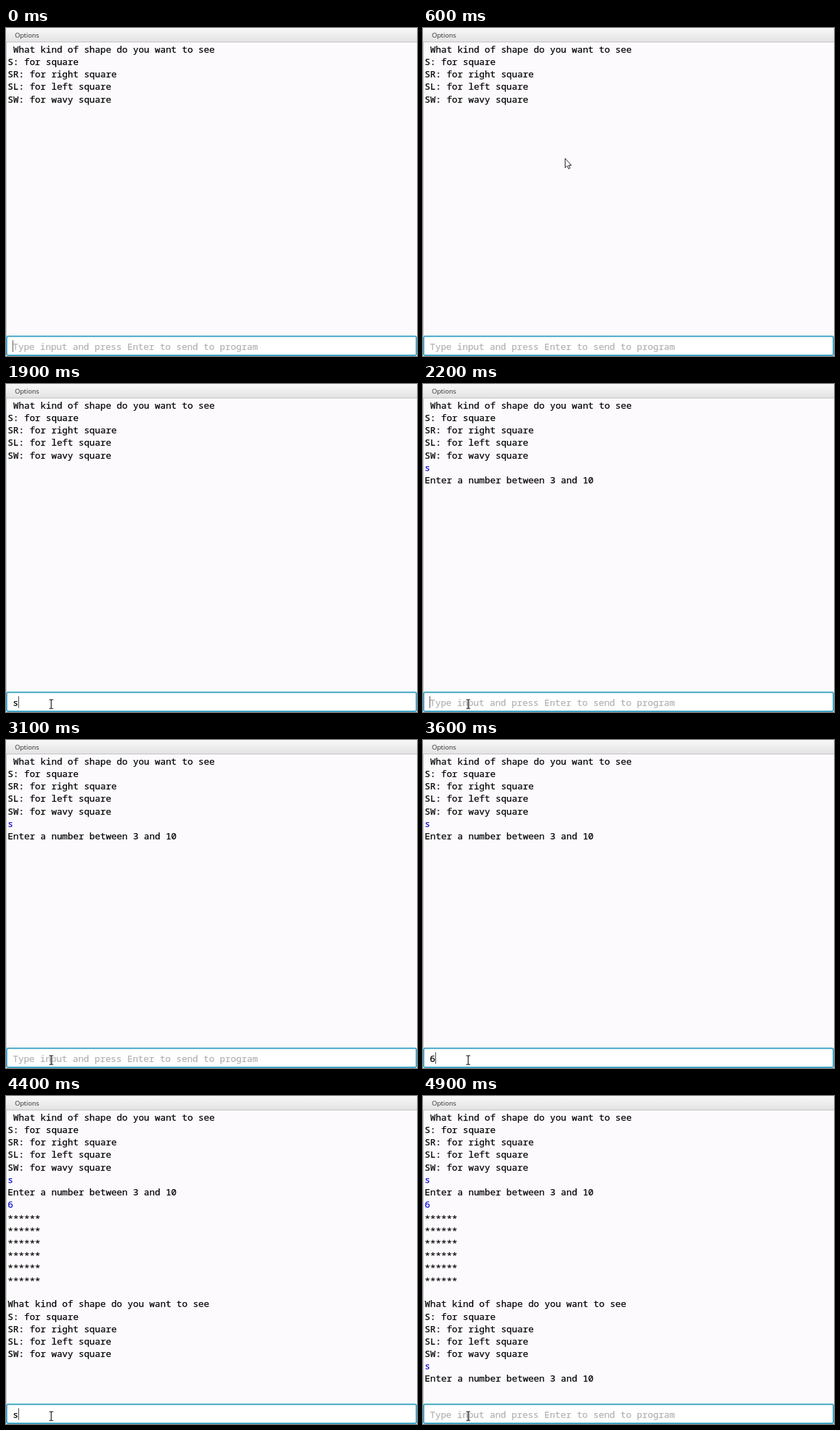
Animation of 600x479 px, one loop 5 s. Source, as an HTML page:

```html
<!DOCTYPE html>
<html lang="en">
<head>
<meta charset="utf-8">
<title>Shape console</title>
<style>
  html, body { margin: 0; width: 100%; height: 100%; overflow: hidden; background: #fff; }
  svg { display: block; }
  text {
    --ink: #000;
    white-space: pre;
    font: 13.26px "Roboto Mono", "Noto Sans Mono", monospace;
    fill: var(--ink);
    stroke: var(--ink);
    stroke-width: .25;
  }
  .menu { --ink: #2c2c2c; font: 9.6px "Open Sans", "Noto Sans", sans-serif; stroke: none; }
  .user { --ink: #0c0cd4; }
  .hint { --ink: #b3b1b4; }
</style>
</head>
<body>
<svg width="600" height="479" viewBox="0 0 600 479">
  <defs>
    <linearGradient id="bar" x2="0" y2="1">
      <stop stop-color="#f8f8f8"/>
      <stop offset="1" stop-color="#e4e3e4"/>
    </linearGradient>
  </defs>
  <rect width="600" height="479" fill="#fcfafd"/>
  <rect width="600" height="20" fill="url(#bar)"/>
  <rect y="20" width="600" height="1" fill="#c4c3c4"/>
  <rect y="20" width="1" height="430" fill="#c4c3c4"/>
  <text class="menu" x="13" y="13.6">Options</text>
  <g id="output"></g>
  <rect x="1" y="450.2" width="598" height="27.8" rx="2" fill="#fff" stroke="#3fa5c6" stroke-width="1.9"/>
  <text id="hint" class="hint" x="10" y="469.5">Type input and press Enter to send to program</text>
  <text id="typed" x="10" y="469.5"></text>
  <rect id="caret" y="456" width="1" height="17" fill="#444"/>
  <path id="arrow" d="M.5.5V14l3-2.8 2.1 4.6 2-1-2-4.3H9.6z" fill="#fff" stroke="#222"/>
  <path id="beam" d="M-3-6.5h2.4l.6.6.6-.6H3M0-6V6M-3 6.5h2.4l.6-.6.6.6H3" fill="none" stroke="#111" stroke-width="1.2"/>
</svg>
<script>
const $ = id => document.getElementById(id);
const LOOP = 5000, STEP = 100, ROW = 18.17, CHAR = 7.96;

const question = "What kind of shape do you want to see";
const options = ["S: for square", "SR: for right square", "SL: for left square", "SW: for wavy square"];
const ask = "Enter a number between 3 and 10";
const lines = [
  " " + question, ...options, "s", ask,
  "6", ...Array(6).fill("******"), "", question, ...options,
  "s", ask
];

const rows = lines.map((line, i) => {
  const el = document.createElementNS("http://www.w3.org/2000/svg", "text");
  const drop = line[0] === "*" ? 2.5 : 0;
  el.setAttribute("x", 2.6);
  el.setAttribute("y", 35.9 + i * ROW + drop);
  if (line.length === 1) el.setAttribute("class", "user");
  el.textContent = line;
  $("output").append(el);
  return el;
});

// Each entry is typed, then sent, revealing more rows.
const entries = [
  { key: "s", type: 1800, send: 2200, rows: 7 },
  { key: "6", type: 3300, send: 3700, rows: 20 },
  { key: "s", type: 4200, send: 4600, rows: 22 }
];
// Times at which the caret toggles, starting visible
const blinks = [0, 200, 400, 600, 800, 1000, 1200, 1400, 1600, 2500, 2700, 3000, 3300, 4000, 4200, 4900];

// Pointer stops: time, x, y
const path = [[100, 310, 462], [400, 207, 190], [700, 207, 190], [800, 219, 184], [900, 219, 184], [1400, 66, 467.5]];

function pointer(t) {
  const i = path.findIndex(p => p[0] > t);
  if (i < 0) return path[path.length - 1].slice(1);
  const [t0, x0, y0] = path[i - 1], [t1, x1, y1] = path[i];
  const u = (t - t0) / (t1 - t0), k = u * u * (3 - 2 * u);
  return [x0 + (x1 - x0) * k, y0 + (y1 - y0) * k];
}

const show = (el, on) => el.setAttribute("visibility", on ? "visible" : "hidden");

function draw(now) {
  const t = Math.floor(now % LOOP / STEP) * STEP;
  const typing = entries.find(e => t >= e.type && t < e.send);
  const count = entries.reduce((n, e) => t >= e.send ? e.rows : n, 5);
  rows.forEach((row, i) => show(row, i < count));

  $("typed").textContent = typing ? typing.key : "";
  show($("hint"), !typing);
  $("caret").setAttribute("x", typing ? 10 + CHAR : 9.5);
  show($("caret"), blinks.filter(b => b <= t).length % 2);

  const visible = t >= path[0][0];
  const [x, y] = visible ? pointer(t) : [0, 0];
  for (const id of ["arrow", "beam"]) {
    $(id).setAttribute("transform", `translate(${x} ${y})`);
    show($(id), visible && (id === "beam") === (y > 450));
  }
}

const start = performance.now();
function tick() {
  draw(performance.now() - start);
  requestAnimationFrame(tick);
}
tick();
</script>
</body>
</html>
```
